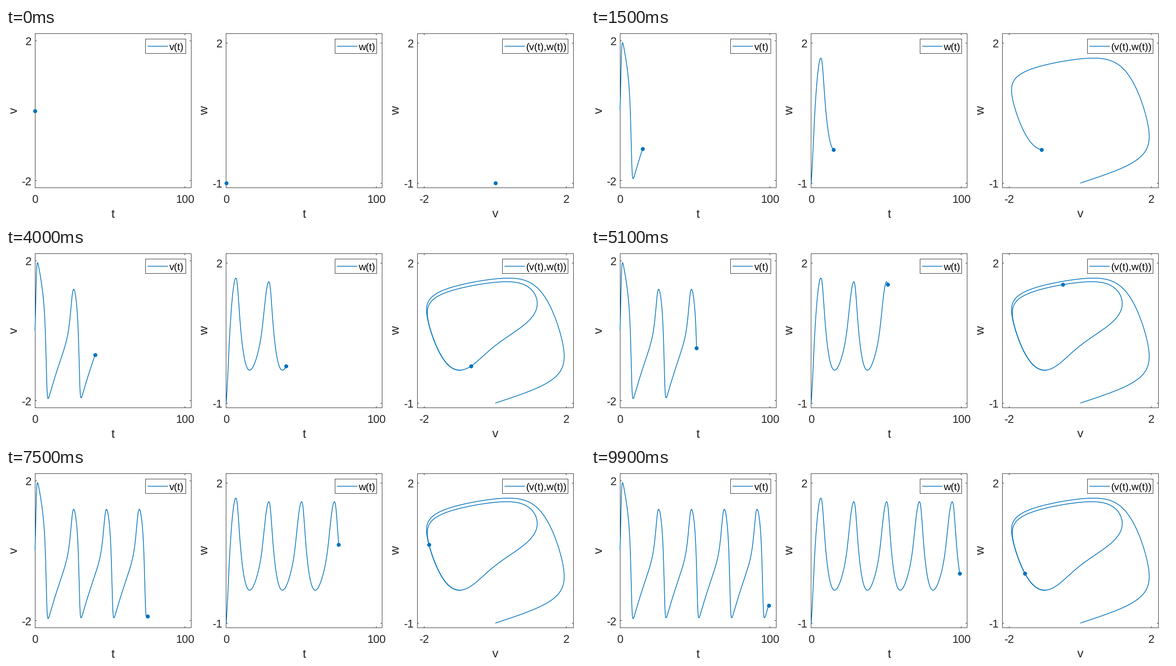
A matplotlib script for the animation above (10000 ms loop, 1280x426 px).

```python
import math

import matplotlib.pyplot as plt
import numpy as np
from matplotlib.animation import FuncAnimation
from matplotlib.patches import Rectangle

W, H, DPI = 1280, 426, 64
PT = 72 / DPI  # points per pixel
BLUE, DARK = "#0072BD", "#262626"
TOP, BOTTOM, WIDTH = 12.5, 354.5, 345
TICK_SIZE, LABEL_SIZE, LEGEND_SIZE = 24.8, 27.2, 22.3
FRAMES, SUB = 100, 20  # one time unit per frame, SUB solver steps in each
RATE = 1.0037  # speed of the model against the time axis
CLOSED = 38  # by this time the orbit has met itself

plt.rcParams["font.family"] = "Liberation Sans"
plt.rcParams["path.snap"] = False
plt.rcParams["text.hinting"] = "none"


def slope(s):
    """FitzHugh-Nagumo model."""
    v, w = s
    return RATE * np.array([v - v**3 / 3 - w + 0.5, 0.25 * (v + 0.8 - 0.7 * w)])


def solve():
    h = 1 / SUB
    path = [np.array([0.0, -1.0])]
    for _ in range((FRAMES - 1) * SUB):
        s = path[-1]
        k1 = slope(s)
        k2 = slope(s + h / 2 * k1)
        k3 = slope(s + h / 2 * k2)
        k4 = slope(s + h * k3)
        path.append(s + h / 6 * (k1 + 2 * k2 + 2 * k3 + k4))
    return np.array(path).T


fig = plt.figure(figsize=(W / DPI, H / DPI), dpi=DPI, facecolor="white")
ax = fig.add_axes([0, 0, 1, 1])
ax.set_xlim(0, W)
ax.set_ylim(H, 0)
ax.axis("off")


def crisp(p):
    return math.floor(p) + 0.5


def text(x, y, s, size, ha="center", color=DARK, rotation=0):
    ax.text(x, y, s, fontsize=size * PT, ha=ha, va="baseline", color=color,
            rotation=rotation, rotation_mode="anchor")


def stroke(xs, ys, color=DARK, width=1.0, z=2):
    return ax.plot(xs, ys, color=color, lw=width * PT, zorder=z,
                   solid_capstyle="butt", solid_joinstyle="round")[0]


def frame_box(x0, y0, x1, y1):
    ax.add_patch(Rectangle((x0, y0), x1 - x0, y1 - y0, fc="white",
                           ec=DARK, lw=PT, zorder=1))


class Panel:
    def __init__(self, column, xlim, ylim, xticks, yticks, names, legend, legend_left):
        self.left = 64.2 + 422.5 * column
        self.xlim, self.ylim = xlim, ylim
        left, right = crisp(self.left), crisp(self.left + WIDTH)
        frame_box(left, TOP, right, BOTTOM)
        for val in xticks:
            x = self.px(val)
            for y, d in ((BOTTOM, -3.5), (TOP, 3.5)):
                stroke([crisp(x)] * 2, [y, y + d])
            text(x, 387.7, str(val), TICK_SIZE)
        for val in yticks:
            y = self.py(val)
            for x, d in ((left, 3.5), (right, -3.5)):
                stroke([x, x + d], [crisp(y)] * 2)
            text(left - 7.5, y + 9.9, str(val), TICK_SIZE, ha="right")
        text(self.left + WIDTH / 2, 420.5, names[0], LABEL_SIZE)
        text(left - 40, (TOP + BOTTOM) / 2, names[1], LABEL_SIZE, rotation=90)

        frame_box(legend_left, 24.5, right - 12, 56.5)
        stroke([legend_left + 4.5, legend_left + 49.5], [40.5] * 2, BLUE, 1.6)
        text(legend_left + 52, 49, legend, LEGEND_SIZE, ha="left", color="black")

        self.curve = stroke([], [], BLUE, 1.6, 3)
        self.dot, = ax.plot([], [], "o", color=BLUE, ms=8.8 * PT, mew=0, zorder=4)

    def px(self, x):
        a, b = self.xlim
        return self.left + (x - a) / (b - a) * WIDTH

    def py(self, y):
        a, b = self.ylim
        return BOTTOM - (y - a) / (b - a) * (BOTTOM - TOP)

    def show(self, xs, ys, shown):
        xs, ys = self.px(xs), self.py(ys)
        self.curve.set_data(xs[:shown], ys[:shown])
        self.dot.set_data(xs[-1:], ys[-1:])


V_LIM, W_LIM, T_LIM = (-2.2, 2.2), (-1.1, 2.2), (0, 104)
v, w = solve()
t = np.arange(len(v)) / SUB

v_panel = Panel(0, T_LIM, V_LIM, (0, 100), (-2, 2), "tv", "v(t)", 308.5)
w_panel = Panel(1, T_LIM, W_LIM, (0, 100), (-1, 2), "tw", "w(t)", 727.5)
phase = Panel(2, V_LIM, W_LIM, (-2, 2), (-1, 2), "vw", "(v(t),w(t))", 1097.5)


def update(i):
    n = i * SUB + 1
    v_panel.show(t[:n], v[:n], n)
    w_panel.show(t[:n], w[:n], n)
    # Retracing the closed orbit would thicken its line.
    phase.show(v[:n], w[:n], min(n, CLOSED * SUB))
    return []


anim = FuncAnimation(fig, update, frames=FRAMES, interval=100,
                     init_func=lambda: update(0), repeat=True, repeat_delay=0)
plt.show()
```
